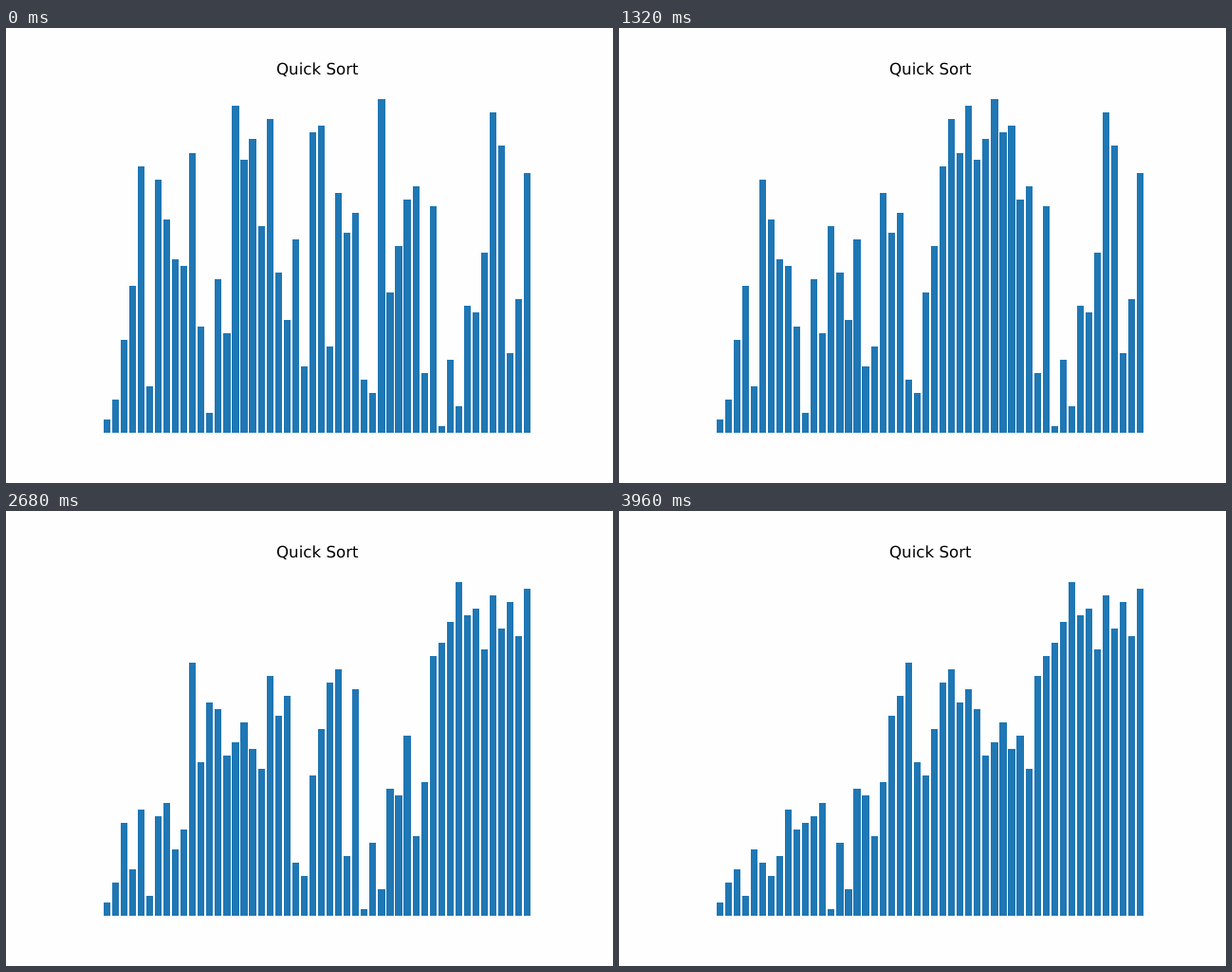
These frames come from a looping animation (640 px wide and 480 px high, 4 s). An HTML page:

```html
<!DOCTYPE html>
<html lang="en">
<head>
<meta charset="utf-8">
<title>Quick Sort</title>
<style>
  html, body { margin: 0; width: 100%; height: 100%; overflow: hidden; background: #fefefe; }
  svg { display: block; width: 640px; height: 480px; }
  text { font: 16.667px "DejaVu Sans", sans-serif; text-rendering: geometricPrecision; }
</style>
</head>
<body>
<svg viewBox="0 0 640 480">
  <text x="285" y="49">Quick Sort</text>
  <g id="bars" fill="#1f77b4" shape-rendering="crispEdges"></g>
</svg>
<script>
// The shuffled input; every later state is computed by sorting it.
const START = [
  2, 5, 14, 22, 40, 7, 38, 32, 26, 25, 42, 16, 3, 23, 15, 49, 41,
  44, 31, 47, 24, 17, 29, 10, 45, 46, 13, 36, 30, 33, 8, 6, 50, 21,
  28, 35, 37, 9, 34, 1, 11, 4, 19, 18, 27, 48, 43, 12, 20, 39
];
const STEP_MS = 40, STEPS = 100;
const BASE = 427.2, UNIT = 7.04;
const PITCH = 496 / 54.78, LEFT = 80 + 2.49 * PITCH, WIDTH = 0.8 * PITCH;

function swap(a, i, j) {
  [a[i], a[j]] = [a[j], a[i]];
}

// Quick sort with the last item as pivot; yields after every comparison.
function* quickSort(a, lo, hi) {
  if (lo >= hi) return;
  const pivot = a[hi];
  let edge = lo;
  for (let j = lo; j < hi; j++) {
    if (a[j] < pivot) swap(a, edge++, j);
    yield a;
  }
  swap(a, edge, hi);
  yield a;
  yield* quickSort(a, lo, edge - 1);
  yield* quickSort(a, edge + 1, hi);
}

function record() {
  const list = START.slice(), states = [];
  const sorter = quickSort(list, 0, list.length - 1);
  sorter.next(); // the first comparison happens before the loop begins
  while (states.length < STEPS) states.push(sorter.next().value.slice());
  return states;
}

const states = record();
const group = document.getElementById("bars");
const bars = START.map((_, i) => {
  const bar = document.createElementNS(group.namespaceURI, "rect");
  const x = LEFT + i * PITCH, left = Math.round(x);
  bar.setAttribute("x", left);
  bar.setAttribute("width", Math.round(x + WIDTH) - left);
  return group.appendChild(bar);
});

function draw(ms) {
  const state = states[Math.floor(ms / STEP_MS) % STEPS];
  bars.forEach((bar, i) => {
    const top = Math.round(BASE - UNIT * state[i]);
    bar.setAttribute("y", top);
    bar.setAttribute("height", Math.round(BASE) - top);
  });
}

const begin = performance.now();
function tick() {
  draw(Math.max(0, performance.now() - begin));
  requestAnimationFrame(tick);
}
tick();
</script>
</body>
</html>
```
